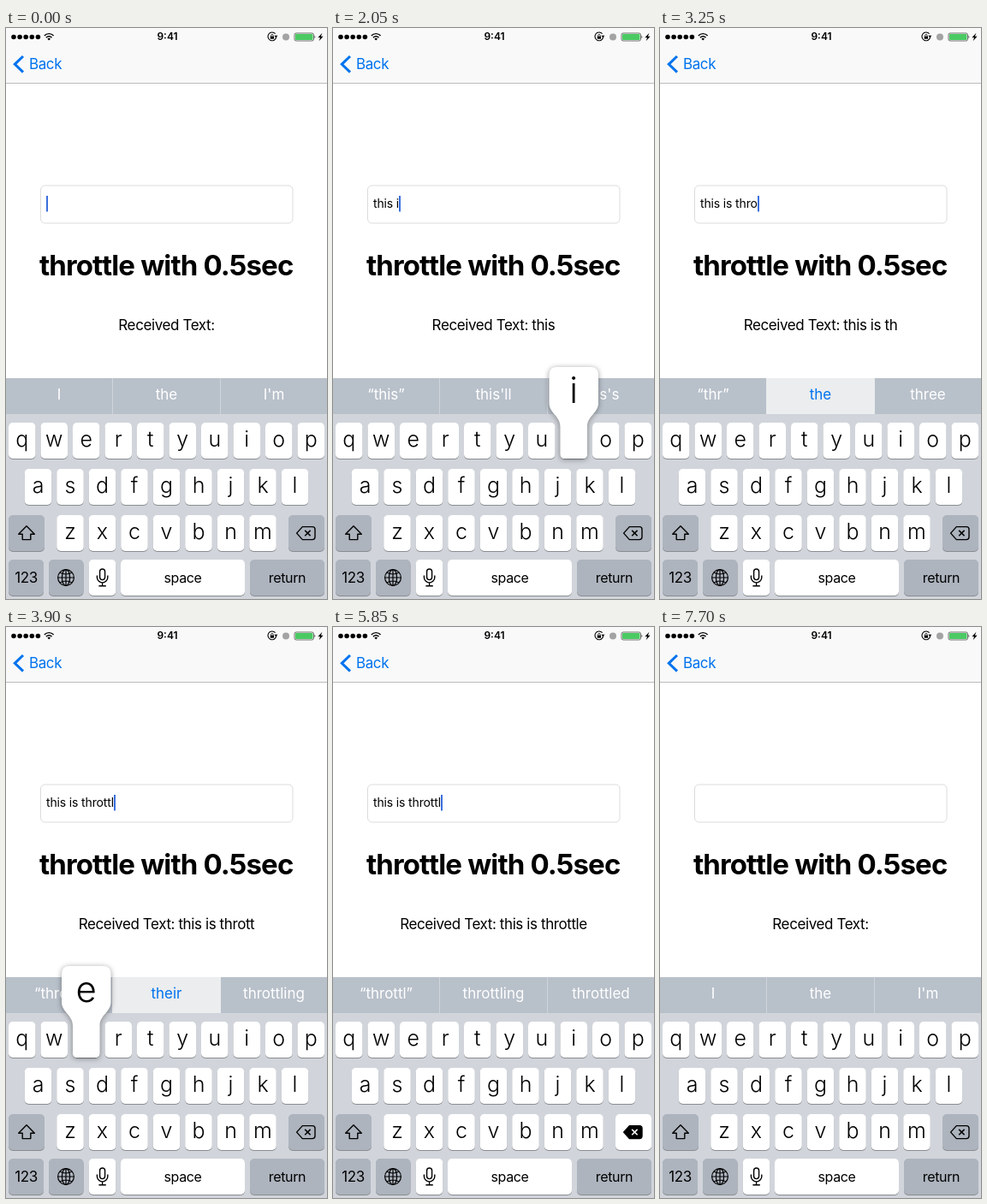
Recreate the animation shown at these times as an HTML page. Size 375 px wide and 667 px high, loop 7750 ms.

```html
<!DOCTYPE html>
<html lang="en">
<head>
<meta charset="utf-8">
<title>Throttle demo</title>
<style>
  html, body { margin: 0; width: 100%; height: 100%; overflow: hidden; background: #fff; }
  svg { display: block; }
  text { font: 17px Inter, sans-serif; font-optical-sizing: none; white-space: pre; }
  .mid { text-anchor: middle; }
  .line { fill: none; stroke: #000; stroke-width: 1.4; }
  .key { filter: drop-shadow(0 1px 0 #898c90); }
  .popup { filter: drop-shadow(0 1px 3px rgba(0, 0, 0, .4)); }
  .letter { font-size: 25px; font-weight: 350; }
  .popup text { font-size: 42px; font-weight: 300; }
  .label { font-size: 16px; letter-spacing: -.35px; }
  .body { letter-spacing: -.4px; }
</style>
</head>
<body>
<svg width="375" height="667" viewBox="0 0 375 667">
  <rect width="375" height="64" fill="#f9f9f9"/>
  <rect y="64" width="375" height="1" fill="#bcbcbc"/>

  <g id="status">
    <path d="M9 10.5h29" stroke="#000" stroke-width="5.6" stroke-linecap="round" stroke-dasharray="0 7.1"/>
    <path class="line" d="M44.8 9a7.4 7.4 0 0 1 10.8 0M46.9 11.2a4.5 4.5 0 0 1 6.6 0"/>
    <path d="M48.4 12.7a2.6 2.6 0 0 1 3.6 0l-1.8 1.9z"/>
    <text class="mid" x="188.5" y="14.4" style="font-size:12px;font-weight:600">9:41</text>
    <path class="line" d="M314.6 6.7a4.9 4.9 0 1 0 1.1 4" style="stroke-width:1.1"/>
    <path d="M313.4 8.8h4l-2 2.6zM308.8 9.8h4.2v3h-4.2z"/>
    <path class="line" d="M309.7 10V8.7a1.2 1.2 0 0 1 2.4 0V10" style="stroke-width:.8"/>
    <circle cx="327" cy="10.5" r="4" fill="#a3a3a3"/>
    <rect x="337" y="6" width="22.5" height="9" rx="2" fill="#fff" stroke="#333" stroke-width=".7"/>
    <rect x="338" y="7" width="20.5" height="7" rx="1" fill="#4bca63"/>
    <path d="M360.6 8.8q1.6 1.7 0 3.4zM369.4 5.8l-5 5.4h2.7l-1.4 4 4.9-5.5h-2.7z"/>
  </g>

  <path d="M20 33L10.3 42.3L20 51.6" fill="none" stroke="#0073ee" stroke-width="3"/>
  <text class="body" x="27" y="48" fill="#0073ee">Back</text>

  <rect x="40.5" y="184" width="294.5" height="44" rx="5" fill="#fff" stroke="#dcdcdc"/>
  <text id="input" x="47" y="210.4" style="font-size:14px;letter-spacing:-.15px"></text>
  <rect id="caret" y="196" width="2" height="18.5" fill="#3a6fdc"/>
  <text class="mid" x="187.2" y="288.6" style="font-size:33px;font-weight:700;letter-spacing:-.85px">throttle with 0.5sec</text>
  <text class="mid body" id="received" x="187.5" y="352.7"></text>

  <rect y="409" width="375" height="258" fill="#d1d5db"/>
  <g id="bar"></g>
  <g id="keys"></g>
  <g id="icons">
    <path class="line" d="M24 581.8L33.3 591.2H28.8V597.6H19.2V591.2H14.7Z" stroke-linejoin="round"/>
    <g class="line" style="stroke-width:1.2">
      <circle cx="70" cy="642" r="9.4"/><ellipse cx="70" cy="642" rx="4.6" ry="9.4"/>
      <path d="M60.6 642h18.8M70 632.6v18.8M63 636q7 4 14 0M63 648q7-4 14 0"/>
    </g>
    <rect class="line" x="109.6" y="632" width="6" height="12.6" rx="3"/>
    <path class="line" d="M106.4 639.5v2.2a6.2 6.2 0 0 0 12.4 0v-2.2M112.6 648v3.6M108.4 651.7h8.4"/>
    <path id="eraser" class="line" d="M346.3 582.6H358a3 3 0 0 1 3 3V594.6a3 3 0 0 1-3 3H346.3L339.6 590.1Z" stroke-linejoin="round"/>
    <path id="cross" class="line" d="M349.2 586.9l6.4 6.4m0-6.4l-6.4 6.4" style="stroke-width:1.6"/>
  </g>
  <g id="popups"></g>
</svg>
<script>
const LOOP = 7750, WINDOW = 500, PHRASE = 'this is throttle';
const GREY = '#adb4be';
const $ = id => document.getElementById(id);

// Moment at which each character of the phrase is entered.
const typed = [1080, 1270, 1420, 1560, 1770, 1990, 2180, 2380,
               2620, 2800, 2970, 3120, 3380, 3460, 3720, 3960];
const DELETE_DOWN = 5700, DELETE_UP = 7100;

const edits = typed.map((at, i) => ({ at, length: i + 1 }));
for (let left = 15; left >= 0; left--)
  edits.push({ at: left === 15 ? 5750 : 6210 + (14 - left) * 60, length: left });

const latest = (list, t) => list.reduce((n, e) => e.at <= t ? e.length : n, 0);

// The first edit opens a window; its end passes on the newest text.
const emitted = [];
let windowEnd = -1;
for (const { at } of edits) {
  if (at <= windowEnd) continue;
  windowEnd = at + WINDOW;
  emitted.push({ at: windowEnd, length: latest(edits, windowEnd) });
}

// Suggestions by text length; * marks a highlighted middle one.
const suggestions = [
  "I|the|I'm", '“t”|the|to', '“th”|the|that', '“thi”|this|think',
  "“this”|this'll|this's", "“this”|this'll|this's", "“i”|is|it", "“is”|isn't|is",
  'the|a|not', '“t”|the|to', '“th”|the|that', '“thr”|*the|three',
  '“thro”|through|throw', '“throt”|*throat|throttle', '“thrott”|*their|throttling',
  '“throttl”|throttling|throttled', '“throttle”|throttled|throttles'
];

// [start, end, opacity reached]
const blinks = [[50, 350, 0], [500, 650, 1], [900, 1050, 0], [1080, 1081, 1],
  [4250, 4500, 0], [4700, 4800, 1], [5100, 5350, 0], [5600, 5700, 1], [7350, 7700, 0]];

const keys = {};
function addKey(name, x, y, width, fill = '#fff', cls = 'label', label = name) {
  const baseline = y + (cls === 'letter' ? 28.2 : 26.5);
  $('keys').insertAdjacentHTML('beforeend',
    `<rect class="key" x="${x}" y="${y}" width="${width}" height="42" rx="5" fill="${fill}"/>
     <text class="mid ${cls}" x="${x + width / 2}" y="${baseline}">${label}</text>`);
  keys[name] = { x, y, rect: $('keys').lastElementChild.previousElementSibling };
}
[['qwertyuiop', 3, 461], ['asdfghjkl', 21.75, 515], ['zxcvbnm', 59.25, 569]].forEach(([row, x, y]) =>
  [...row].forEach((c, i) => addKey(c, x + i * 37.5, y, 31.5, '#fff', 'letter')));
addKey('shift', 3, 569, 42, GREY, 'label', '');
addKey('delete', 330, 569, 42, GREY, 'label', '');
addKey('123', 3, 621, 41, GREY, 'body');
addKey('globe', 50, 621, 40.5, GREY, 'label', '');
addKey('mic', 96.8, 621, 31.5, '#fff', 'label', '');
addKey('space', 134, 621, 145, '#fff');
addKey('return', 285, 621, 87, GREY);

const popups = {};
for (const c of new Set(PHRASE.replaceAll(' ', ''))) {
  $('popups').insertAdjacentHTML('beforeend',
    `<g class="popup" transform="translate(${keys[c].x} ${keys[c].y})">
      <path fill="#fff" d="M0 37V5C0-8-13-11-13-23V-56Q-13-65-4-65H35.5Q44.5-65 44.5-56V-23
        C44.5-11 31.5-8 31.5 5V37Q31.5 42 26.5 42H5Q0 42 0 37Z"/>
      <text class="mid" x="15.75" y="-23">${c}</text></g>`);
  popups[c] = $('popups').lastElementChild;
}

const slots = [[0, 124, 62], [125, 125, 187.5], [251, 124, 313]].map(([x, width, center]) => {
  $('bar').insertAdjacentHTML('beforeend',
    `<rect x="${x}" y="409" width="${width}" height="42"/><text class="mid" x="${center}" y="434.3"></text>`);
  const label = $('bar').lastElementChild;
  return { x, width, label, box: label.previousElementSibling };
});

function showSuggestion({ x, width, label, box }, word) {
  const marked = word[0] === '*';
  label.textContent = marked ? word.slice(1) : word;
  label.setAttribute('fill', marked ? '#0073ee' : '#fff');
  box.setAttribute('fill', marked ? '#ebedef' : '#b8c0ca');
  // A highlight also covers the dividers on both sides.
  box.setAttribute('x', marked ? x - 1 : x);
  box.setAttribute('width', marked ? width + 2 : width);
}

function render(t) {
  const text = PHRASE.slice(0, latest(edits, t));
  $('input').textContent = text;
  $('received').textContent = ('Received Text: ' + PHRASE.slice(0, latest(emitted, t))).trim();

  $('caret').setAttribute('x', Math.round(47 + (text ? $('input').getComputedTextLength() : 0)));
  $('caret').setAttribute('opacity', blinks.reduce((alpha, [from, to, goal]) =>
    t < from ? alpha : alpha + (goal - alpha) * Math.min(1, (t - from) / (to - from)), 1));

  const lag = t > DELETE_DOWN ? 90 : 190;
  suggestions[latest(edits, t - lag)].split('|').forEach((word, i) => showSuggestion(slots[i], word));

  const pressed = new Set([...PHRASE].filter((c, i) => t >= typed[i] - 110 && t < typed[i] + 125));
  for (const c in popups) popups[c].style.display = pressed.has(c) ? '' : 'none';
  keys.space.rect.setAttribute('fill', pressed.has(' ') ? GREY : '#fff');

  const deleting = t >= DELETE_DOWN && t < DELETE_UP;
  keys.delete.rect.setAttribute('fill', deleting ? '#fff' : GREY);
  $('eraser').style.fill = deleting ? '#000' : 'none';
  $('cross').style.stroke = deleting ? '#fff' : '#000';
}

const start = performance.now();
function tick() {
  const t = (performance.now() - start) % LOOP;
  render(Math.floor(t / 50) * 50);
  requestAnimationFrame(tick);
}
tick();
</script>
</body>
</html>
```
